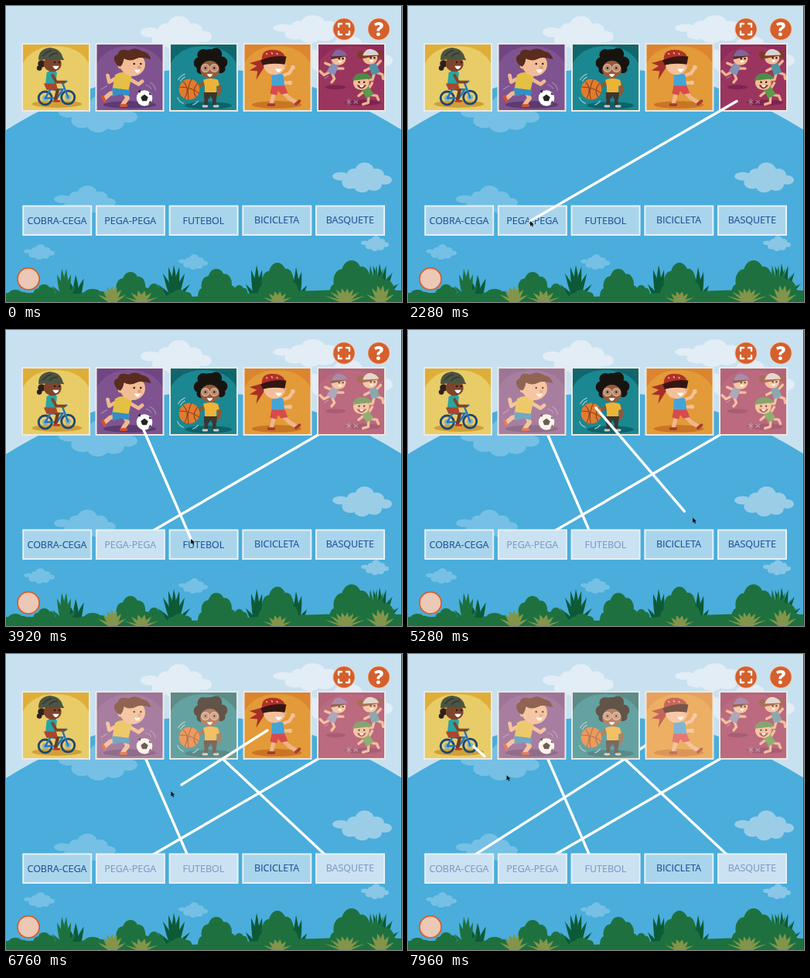
An HTML page that plays this animation: 512 px wide and 384 px high, repeating every 8 s.

```html
<!DOCTYPE html>
<html lang="pt">
<head>
<meta charset="utf-8">
<title>Ligue as brincadeiras</title>
<style>
html, body { margin: 0; width: 100%; height: 100%; overflow: hidden; background: #4aaddb; }
svg { display: block; width: 100vw; height: 100vh; }
text { font-family: "Open Sans", "Noto Sans", sans-serif; text-anchor: middle; }
</style>
</head>
<body>
<svg id="stage" viewBox="0 0 512 384" stroke-linecap="round" stroke-linejoin="round"></svg>
<script>
const stage = document.getElementById('stage');
const ell = (x, y, rx, ry, fill) => `<ellipse cx="${x}" cy="${y}" rx="${rx}" ry="${ry}" fill="${fill}"/>`;
const dot = (x, y, r, fill) => ell(x, y, r, r, fill);
const shape = (d, fill) => `<path d="${d}" fill="${fill}"/>`;
const stroke = (d, color, width) => `<path d="${d}" fill="none" stroke="${color}" stroke-width="${width}"/>`;
const ring = (x, y, r, color, width) => `<circle cx="${x}" cy="${y}" r="${r}" fill="none" stroke="${color}" stroke-width="${width}"/>`;
const box = (x, y, w, h, attrs) => `<rect x="${x}" y="${y}" width="${w}" height="${h}" ${attrs}/>`;
const group = (transform, content) => `<g transform="${transform}">${content}</g>`;

// Scenery: clumps of ellipses in a unit square
const cloudPuffs = [[.54, .28, .16, .28], [.36, .42, .12, .22], [.74, .42, .13, .22], [.14, .46, .14, .14],
  [.88, .58, .12, .16], [.3, .68, .14, .2], [.5, .78, .14, .22], [.7, .74, .13, .2], [.5, .55, .3, .22]];
const bushPuffs = [[.48, .3, .22, .3], [.27, .46, .18, .26], [.7, .42, .18, .28], [.12, .75, .12, .22],
  [.87, .7, .13, .24], [.5, .75, .42, .3]];
const clump = (puffs, x, y, w, h, fill) =>
  puffs.map(([a, b, c, d]) => ell(x + a * w, y + b * h, c * w, d * h, fill)).join('');
const cloud = (...args) => clump(cloudPuffs, ...args);
const grass = '#1e713f', darkLeaf = '#0c5a36', olive = '#82954a';
const bush = (x, y, w) => clump(bushPuffs, x, y, w, 388 - y, grass);

function leaves(x, spread, height, count, fill) {
  let out = '';
  for (let i = 0; i < count; i++) {
    const k = i / (count - 1) * 2 - 1;
    const tipX = x + k * spread, tipY = 386 - height * (1 - .5 * k * k);
    const midX = x + k * spread * .35, midY = (386 + tipY) / 2;
    out += shape(`M${x - 2},386Q${midX - 5},${midY} ${tipX},${tipY}Q${midX + 6},${midY} ${x + 3},386Z`, fill);
  }
  return out;
}

const scenery =
  box(0, 0, 512, 384, 'fill="#c8e1f0"') +
  cloud(174, 13, 92, 46, '#e2edf6') + cloud(345, 12, 96, 36, '#e2edf6') + cloud(375, 38, 125, 56, '#e2edf6') +
  shape('M0,161Q256,1 512,161V384H0Z', '#4aaddb') +
  cloud(68, 116, 102, 48, '#75c0e4') + cloud(62, 233, 80, 38, '#75c0e4') +
  cloud(422, 203, 77, 39, '#9bcde7') + cloud(23, 309, 40, 20, '#75c0e4') +
  cloud(223, 322, 38, 20, '#75c0e4') + cloud(459, 298, 36, 20, '#8ac6e6') +
  leaves(217, 21, 50, 7, darkLeaf) + leaves(324, 14, 50, 5, darkLeaf) + leaves(375, 14, 47, 5, darkLeaf) +
  leaves(90, 21, 37, 5, darkLeaf) + leaves(483, 25, 52, 7, darkLeaf) +
  shape('M0,373Q60,370 120,375T270,376Q400,366 512,369V384H0Z', grass) +
  bush(-8, 368, 42) + bush(32, 361, 36) + leaves(75, 15, 46, 6, grass) + bush(88, 367, 50) +
  bush(138, 345, 48) + bush(176, 360, 32) + bush(205, 368, 40) +
  bush(248, 341, 50) + bush(288, 362, 28) + bush(326, 333, 52) +
  bush(418, 330, 60) + leaves(475, 30, 50, 8, grass) + bush(452, 350, 56) +
  leaves(137, 18, 23, 7, olive) + leaves(175, 22, 17, 6, olive) +
  leaves(351, 18, 16, 6, olive) + leaves(438, 26, 20, 8, olive) + leaves(484, 18, 24, 6, olive) +
  box(511, 0, 1, 384, 'fill="#2b4f63"');

const button = (x, y) => dot(x, y, 15, '#ead3c6') + dot(x, y, 13.7, '#d4602d');
const controls =
  button(437, 30) + button(482, 30) +
  dot(29, 354, 15, '#d4602d') + dot(29, 354, 13.2, '#ecc8b6') +
  stroke('M430,27V23H434M440,23H444V27M444,33V37H440M434,37H430V33', '#fff', 2.4) +
  '<text x="482" y="38.5" font-size="24" font-weight="800" fill="#fff">?</text>';

// Children on the picture cards
const eyes = (x, y, gap) => dot(x, y, 1.3, '#2b1712') + dot(x + gap, y, 1.3, '#2b1712');
const smile = (x, y, w) => shape(`M${x},${y}q${w / 2},${w} ${w},0z`, '#fff');

const cyclist = () =>
  ell(66, 127, 34, 5, '#cf9f38') +
  dot(45, 72, 5, '#2e211c') + dot(42, 78, 3.5, '#2e211c') +
  ring(50, 119, 9, '#1e4672', 3) + ring(81, 118, 9, '#1e4672', 3) +
  dot(50, 119, 4, '#7fb3c8') + dot(81, 118, 4, '#7fb3c8') +
  stroke('M50,119L57,107H74L66,119ZM81,118L73,97L79,96M57,107L55,103', '#2277bd', 2.6) +
  stroke('M57,103L67,108L64,121', '#6d3c26', 4.5) + stroke('M62,123H69', '#b93a2c', 3) +
  shape('M52,84Q60,79 66,84L64,102H50Z', '#2ba3a3') + shape('M48,99H65L67,107L52,108Z', '#a8472f') +
  stroke('M60,88L65,97L76,97', '#7d452b', 4) +
  ell(60, 72, 12, 11, '#7d452b') +
  eyes(63, 70, 6) + smile(60, 75, 9) +
  shape('M41,67Q40,52 56,50Q71,51 74,64L76,67Q58,65 41,67Z', '#4d5443') +
  stroke('M47,61Q52,55 58,54M56,62Q61,57 66,58', '#343a31', 1.8);

const footballer = () =>
  ell(160, 128, 36, 5, '#5b3b70') +
  stroke('M144,110L133,113L126,119', '#efb992', 6) + stroke('M153,111L157,119L151,127', '#efb992', 6) +
  stroke('M123,117L126,123M148,129H155', '#d9502f', 4) +
  stroke('M143,91L132,97L130,88', '#efb992', 5) + stroke('M160,93L172,100L177,96', '#efb992', 5) +
  shape('M140,87Q151,80 163,88L158,110L136,108Z', '#e4c044') +
  shape('M136,105L160,108L159,116L148,114L137,117Z', '#338fc4') +
  ell(164, 73, 17, 16, '#f2bd96') + dot(148, 75, 4, '#f2bd96') +
  shape('M143,74Q134,63 144,59Q145,50 158,54Q168,48 177,55Q186,56 189,66Q178,63 172,64Q160,70 152,65Q151,73 147,76Z', '#5a2c1d') +
  eyes(166, 72, 9) + dot(173, 77, 2.4, '#e39b78') + smile(166, 80, 9) +
  dot(180, 119, 10.8, '#fff') +
  shape('M180,114l5,3.5l-2,5.5h-6l-2,-5.5zM171,110l4,-3l-1,5zM187,111l3,4l-4,-1zM188,122l1,3l-4,3z', '#222') +
  stroke('M188,98Q194,101 195,108M182,101Q187,102 189,106M121,107L129,102', '#a58bb5', 1.2);

const basketballer = () =>
  ell(262, 129, 32, 5, '#0d626b') +
  stroke('M259,112V127M270,112V127', '#3d352f', 5) + stroke('M255,130H260M270,130H275', '#c9cdc6', 3) +
  stroke('M258,97L247,104M273,97L278,106L275,114', '#8f5739', 5) +
  shape('M255,94Q265,90 275,94L277,101L273,103V113H257V102Z', '#edb336') +
  shape('M256,111H274L273,120H267L265,116L263,120H256Z', '#3d352f') +
  dot(264, 68, 16, '#171410') + dot(250, 71, 8, '#171410') + dot(280, 70, 8, '#171410') +
  dot(255, 60, 8, '#171410') + dot(272, 59, 8.5, '#171410') + dot(252, 80, 6, '#171410') + dot(279, 79, 6, '#171410') +
  ell(264, 80, 13, 12, '#935b3d') +
  dot(258, 78, 5, '#b78d76') + dot(270, 78, 5, '#b78d76') +
  ring(258, 78, 5.3, '#e7b699', 1.2) + ring(270, 78, 5.3, '#e7b699', 1.2) +
  eyes(258, 78, 12) + smile(260, 86, 8) +
  dot(236, 107, 14, '#e27b2e') +
  stroke('M223,104Q237,103 249,112M239,93Q232,106 235,121M228,97Q237,105 230,119M247,99Q239,108 245,117', '#8b4321', 1.2) +
  stroke('M221,94Q224,88 230,86M224,96Q226,92 230,90M220,118Q222,124 228,126M248,123Q245,127 241,128', '#a6d0d0', 1.2);

const blindfolded = () =>
  ell(350, 128, 34, 5, '#c87525') +
  stroke('M347,110L343,125M358,110L367,119L375,124', '#efb68b', 5.5) +
  stroke('M339,128H346M376,127L381,123', '#a9392f', 4) +
  shape('M331,66L313,71L323,75L313,81L324,82L322,94L334,75Z', '#a62f28') +
  stroke('M345,92L350,98L366,98M356,89L367,85L372,77', '#f3c09a', 4.5) +
  dot(368, 98, 3, '#f3c09a') + dot(372, 77, 3, '#f3c09a') +
  shape('M343,88Q350,83 359,87L361,105H343Z', '#46a4d5') +
  shape('M343,102H361L365,112L356,114L352,109L350,115L341,113Z', '#d84a4c') +
  ell(347, 73, 15, 14, '#f3c09a') + dot(361, 74, 2.5, '#e8aa83') +
  shape('M330,68Q328,53 344,53Q358,53 361,62L330,70Z', '#b03029') +
  shape('M328,67Q345,60 363,62L361,73Q344,70 331,74Z', '#351712') +
  stroke('M336,58l1,1M343,57l1,1M350,58l1,1', '#efb28e', 1.6) + smile(348, 79, 9);

const runner = (x, y, lean, shirt, hat, hair) => group(`rotate(${lean} ${x} ${y})`,
  stroke(`M${x - 2},${y + 22}l-5,7l-7,-2M${x + 2},${y + 22}l6,5l-1,6`, '#efb48e', 3.6) +
  stroke(`M${x - 4},${y + 13}l-9,1M${x + 4},${y + 13}l8,-4`, '#efb48e', 3.6) +
  shape(`M${x - 5},${y + 9}h10l1,14h-12z`, shirt)) +
  ell(x, y, 10, 9, '#f2bd96') + shape(`M${x - 10},${y + 1}Q${x - 12},${y - 11} ${x},${y - 11}T${x + 10},${y - 3}Z`, hair) +
  shape(`M${x - 10},${y - 3}Q${x - 7},${y - 13} ${x + 2},${y - 12}Q${x + 10},${y - 10} ${x + 12},${y - 4}Z`, hat) +
  eyes(x + 1, y, 5) + smile(x - 1, y + 3, 6);

const chasers = () =>
  ell(462, 125, 25, 4, '#7d244f') + ell(425, 104, 14, 3, '#7d244f') +
  runner(429, 65, 28, '#8790b8', '#83649f', '#5c2c21') +
  dot(459, 60, 5, '#803b22') + dot(484, 59, 5, '#803b22') +
  runner(472, 64, -20, '#4f93a5', '#d9d5d2', '#803b22') +
  runner(460, 97, -32, '#5c9a4c', '#4f8b47', '#6a331e') +
  ell(460, 98, 11, 10, '#f2bd96') + shape('M448,95Q450,85 460,85Q470,84 475,92Z', '#4f8b47') +
  eyes(457, 97, 7) + shape('M454,101Q460,111 467,101Z', '#8e2b25') + smile(457, 101, 7) +
  stroke('M440,122l6,4m0,-4l-6,4m3,-6v8M450,122l5,4m0,-4l-5,4M410,92l5,-3', '#b07a9b', 1.2);

const pictures = [
  { color: '#e8cc67', corner: '#dfae38', draw: cyclist },
  { color: '#7f5390', corner: '#6f4583', draw: footballer },
  { color: '#1b8791', corner: '#10666d', draw: basketballer },
  { color: '#e39a38', corner: '#dc8430', draw: blindfolded },
  { color: '#9a355f', corner: '#8e2c5b', draw: chasers }
];
const labels = ['COBRA-CEGA', 'PEGA-PEGA', 'FUTEBOL', 'BICICLETA', 'BASQUETE'];

const pictureCards = pictures.map(({ color, corner, draw }, i) => {
  const x = 21 + i * 95.5, middle = x + 43.5;
  return box(x, 49, 87, 87, `fill="${corner}"`) +
    shape(`M${x},136V76Q${x + 12},52 ${middle},52T${x + 87},76V136Z`, color) +
    group(`translate(${middle} 130) scale(.95) translate(${-middle} -130)`, draw()) +
    box(x, 49, 87, 87, `id="picture${i}" fill="#ffdac0" opacity="0"`) +
    box(x, 49, 87, 87, 'fill="none" stroke="#ece9e2" stroke-width="2" stroke-linejoin="miter"');
}).join('');

const labelCards = labels.map((label, i) => {
  const x = 22.2 + i * 94.7;
  return box(x, 259.5, 88, 37.5, 'fill="#a9d5ec"') +
    `<text x="${x + 43.8}" y="${283.2 - i * .25}" font-size="12.5" fill="#22549a" stroke="#22549a" stroke-width=".15">${label}</text>` +
    box(x, 259.5, 88, 37.5, `id="label${i}" fill="#f0eff9" opacity="0"`) +
    box(x, 259.5, 88, 37.5, 'fill="none" stroke="#e4f1f8" stroke-width="2" stroke-linejoin="miter"');
}).join('');

stage.innerHTML = scenery + controls +
  '<path id="joined" fill="none" stroke="#fff" stroke-width="3.4"/>' + pictureCards + labelCards +
  '<path id="dragged" fill="none" stroke="#fff" stroke-width="3.4"/>' +
  '<path id="cursor" d="M0,0V6.5L1.6,5.2 2.9,7.6 4,7 2.8,4.7 4.8,4.5Z" fill="#111"/>';

// Pointer path: time, x, y, downward bend of the way there
const pointerKeys = [
  [80, 470, 400], [900, 425, 123.5], [1150, 425, 123.5], [2240, 158, 279], [2450, 158, 279],
  [3080, 176, 125], [3200, 176, 125], [3900, 239, 271], [4080, 239, 271], [4680, 243, 101],
  [4820, 243, 101], [5570, 430, 277, 28], [5720, 430, 277], [6225, 338, 99, 50], [6350, 338, 99],
  [7180, 85, 260], [7300, 83, 263], [7780, 85, 120], [7895, 85, 120], [8155, 350, 278, 22]
];
const drags = [
  { start: 1150, end: 2450, picture: 4, label: 1 },
  { start: 3200, end: 4050, picture: 1, label: 2 },
  { start: 4820, end: 5700, picture: 2, label: 4 },
  { start: 6350, end: 7300, picture: 3, label: 0 },
  { start: 7895, end: 9000, picture: 0, label: 3 }
];
const duration = 8000, lineLag = 30, fadeTime = 160;

function pointerAt(time) {
  const next = pointerKeys.findIndex(key => key[0] > time);
  if (next === 0) return pointerKeys[0].slice(1, 3);
  const [t0, x0, y0] = pointerKeys[next - 1];
  const [t1, x1, y1, bend = 0] = pointerKeys[next];
  const u = (time - t0) / (t1 - t0);
  const s = u * u * (3 - 2 * u);
  return [x0 + (x1 - x0) * s, y0 + (y1 - y0) * s + bend * 4 * s * (1 - s)];
}

const find = id => document.getElementById(id);

function render(time) {
  let joined = '', dragged = '';
  for (const { start, end, picture, label } of drags) {
    const matched = time >= end;
    const fade = Math.min(1, Math.max(0, (time - end) / fadeTime));
    find('picture' + picture).setAttribute('opacity', fade * .32);
    find('label' + label).setAttribute('opacity', fade * .46);
    if (time < start) continue;
    const tip = pointerAt(Math.max(start, Math.min(time, end) - lineLag));
    const line = `M${pointerAt(start)}L${tip}`;
    if (matched) joined += line;
    else dragged += line;
  }
  find('joined').setAttribute('d', joined);
  find('dragged').setAttribute('d', dragged);
  find('cursor').setAttribute('transform', `translate(${pointerAt(time)})`);
}

const startTime = performance.now();
function tick() {
  render((performance.now() - startTime) % duration);
  requestAnimationFrame(tick);
}
tick();
</script>
</body>
</html>
```
